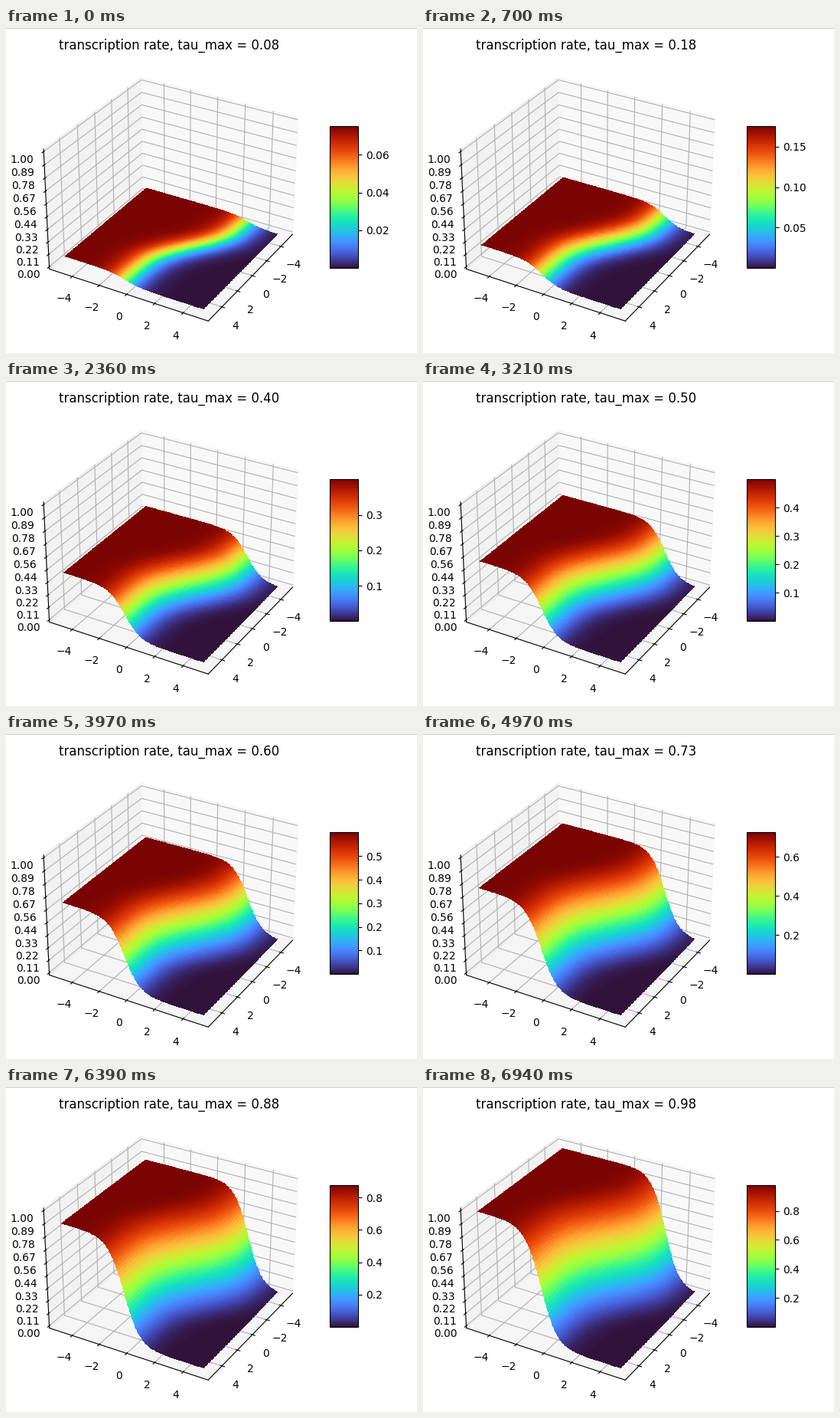
Animation of 537 by 424 pixels, one loop 7.15 s. Source, as a matplotlib script:

```python
import numpy as np
import matplotlib.pyplot as plt
from matplotlib.animation import FuncAnimation
from matplotlib.cm import ScalarMappable
from matplotlib.patches import Rectangle

W, H, DPI = 537, 424, 100
LOOP, INTERVAL = 7150, 50
TAU_STEP = 0.025

# The sweep advances at a slightly uneven pace: step number against time in ms.
STEPS = [3, 4, 9, 10, 11, 16, 17, 19, 20, 24, 25, 29, 30, 33, 34, 36, 37, 39]
TIMES = [0, 90, 940, 1150, 1330, 2360, 2550, 2940, 3210, 3970, 4240, 4970,
         5150, 5810, 6000, 6390, 6550, 6920]

plt.rcParams["font.family"] = "DejaVu Sans"
fig = plt.figure(figsize=(W / DPI, H / DPI), dpi=DPI, facecolor="white")


def rect(left, bottom, width, height):
    return [left / W, bottom / H, width / W, height / H]


def padded(low, high, fraction):
    pad = (high - low) * fraction
    return low - pad, high + pad


def rate(x, y):
    """Hill curve in y whose midpoint is lowered by a second Hill term in x."""
    low, high, hill_x, hill_y = -0.55, 2.72, 1.5, 1.85
    half = hill_y * (high - low) / 2
    u = -hill_x * (x + 0.35)
    shift = np.log1p(np.exp(u + half)) - np.log1p(np.exp(u - half))
    return 1 / (1 + np.exp(hill_y * (y - low) - shift))


box = rect(28.7, 18.4, 369.6, 369.6)
ax = fig.add_axes(box, projection="3d")
ax.view_init(elev=30, azim=30)
ax.set_xticks(range(-4, 5, 2))
ax.set_yticks(range(-4, 5, 2))
ax.set_zticks(np.linspace(0, 1, 10))
ax.zaxis.set_major_formatter("{x:.2f}")
ax.set_xlim(*padded(-5.5, 5.5, 1 / 48))
ax.set_ylim(*padded(-5.5, 5.5, 1 / 48))
ax.set_zlim(*padded(0, 1, 1 / 48))
projection = ax.get_proj()

# The surface is projected by hand onto a flat layer above the 3D box.
layer = fig.add_axes(box)
layer.set_axis_off()
layer.set(xlim=(-0.095, 0.09), ylim=(-0.095, 0.09))
layer.set_autoscale_on(False)

bar = ScalarMappable(cmap="turbo")
bar.set_clim(0, 1)
fig.colorbar(bar, cax=fig.add_axes(rect(423.1, 110.8, 36.96, 184.8)))
fig.add_artist(Rectangle((0, 1 - 1 / H), 1, 1 / H, color="#cccccc", lw=0,
                         transform=fig.transFigure))

grid = np.linspace(-5, 5, 131)
X, Y = np.meshgrid(grid, grid, indexing="ij")
UNIT = rate(X, Y)


def project(z):
    points = np.stack([X, Y, z, np.ones_like(z)]).reshape(4, -1)
    px, py, _, w = projection @ points
    return (px / w).reshape(z.shape), (py / w).reshape(z.shape)


def update(i):
    now = i * INTERVAL + INTERVAL / 2
    tau = int(np.interp(now, TIMES, STEPS)) * TAU_STEP
    z = tau * UNIT
    faces = (z[:-1, :-1] + z[1:, :-1] + z[:-1, 1:] + z[1:, 1:]) / 4
    low, high = faces.min(), faces.max()
    for mesh in list(layer.collections):
        mesh.remove()
    layer.pcolormesh(*project(z), faces, cmap="turbo", vmin=low, vmax=high,
                     shading="flat", antialiased=False)
    bar.set_clim(low, high)
    layer.set_title(f"transcription rate, tau_max = {tau:.2f}", y=1.0)
    return []


anim = FuncAnimation(fig, update, frames=LOOP // INTERVAL, interval=INTERVAL,
                     repeat=True, repeat_delay=0, blit=False)
plt.show()
```
